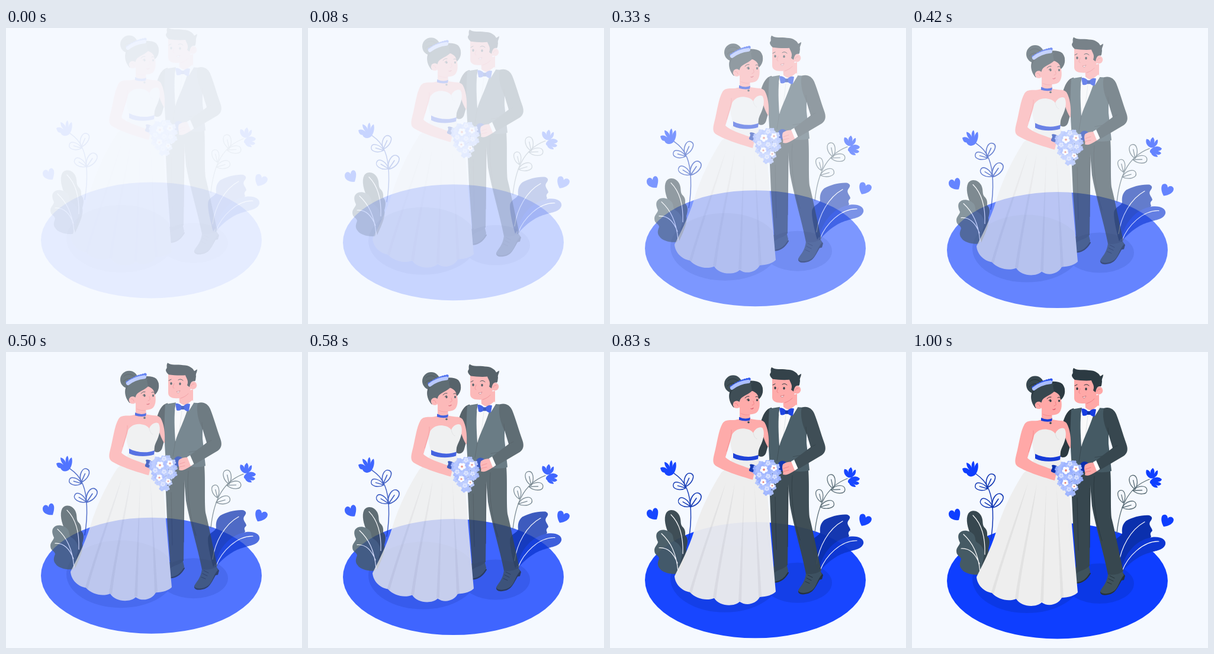
Animation, 500 px wide and 500 px high, one loop 1040 ms. Source, as an HTML page:

```html
<!DOCTYPE html>
<html lang="en">
<head>
<meta charset="utf-8">
<title>Wedding couple</title>
<style>
html, body { margin: 0; width: 100%; height: 100%; overflow: hidden; background: #f5f9ff; }
svg { display: block; width: 100%; height: 100%; }
svg > g { opacity: var(--p, 0); transform: translateY(calc((var(--p, 0) - 1) * 30px)); }
.blue { fill: #0e3eff; }
.navy { fill: #0b30ad; }
.skin { fill: #ffa8a7; }
.hair { fill: #2c3a42; }
.dark { fill: #37474f; }
.slate { fill: #455a64; }
.shoe { fill: #3f525b; }
.cloth { fill: #eee; }
.fold { fill: #e2e2e2; }
.line { fill: none; stroke-linecap: round; stroke-linejoin: round; }
.vein { stroke: #fff; stroke-width: 1.2; }
.ink { stroke: #263238; stroke-width: 1; }
.blush { stroke: #f27f83; stroke-width: 1; }
</style>
</head>
<body>
<svg viewBox="0 0 500 500">
  <defs>
    <path id="leaf" d="M0 0C-9-9-8-23 0-23C8-23 8-9 0 0M0 0V-15"/>
  </defs>

  <g><ellipse class="blue" cx="245.5" cy="386.5" rx="186.5" ry="98"/></g>

  <g>
    <g fill="#001a60" opacity=".15">
      <ellipse cx="194" cy="384" rx="92" ry="57"/>
      <ellipse cx="317" cy="391" rx="58" ry="34"/>
    </g>
  </g>

  <!-- plants -->
  <g>
    <g class="line" stroke="#1238b4" stroke-width="1.5">
      <path d="M133 318C139 283 137 250 130 233C125 220 118 213 108 206"/>
      <use href="#leaf" transform="translate(128 231)rotate(-74)scale(.95)"/>
      <use href="#leaf" transform="translate(127 229)rotate(24)scale(1.07)"/>
      <use href="#leaf" transform="translate(136 262)rotate(-59)"/>
      <use href="#leaf" transform="translate(136 263)rotate(34)scale(1.18)"/>
    </g>
    <path class="blue" d="M108 206C103 212 95 212 92 205C88 205 86 202 85 197C90 194 94 197 97 199C93 195 92 191 92 187C97 188 100 192 101 196C100 191 101 186 104 184C106 188 106 192 105 196C106 192 108 188 111 187C113 194 111 201 108 206Z"/>
    <path class="dark" d="M117 374C110 345 108 328 100 310C94 298 90 282 95 273C101 265 112 268 117 277C121 285 118 291 122 296C128 301 127 307 127 311C133 316 131 325 129 332C131 342 126 354 117 374Z"/>
    <path class="line vein" d="M103 276C118 291 124 315 123 342"/>
    <path class="slate" d="M80 306C85 299 98 301 104 308C108 313 106 318 109 321C118 326 121 333 122 340C120 355 117 365 113 376C100 377 88 373 84 367C78 360 82 354 83 350C82 344 75 345 75 336C75 330 81 326 81 322C78 316 77 310 80 306Z"/>
    <path class="line vein" d="M87 308C102 322 112 340 115 372M83 332C97 331 107 340 114 358"/>

    <g class="line" stroke="#5b6d76" stroke-width="1.3">
      <path d="M346 306C350 268 361 230 401 215"/>
      <use href="#leaf" transform="translate(357 255)rotate(-13)scale(.95)"/>
      <use href="#leaf" transform="translate(355 263)rotate(74)scale(1.05)"/>
      <use href="#leaf" transform="translate(377 232)rotate(-12)scale(1.05)"/>
      <use href="#leaf" transform="translate(373 234)rotate(88)scale(1.04)"/>
    </g>
    <path class="blue" d="M402 213C396 210 394 204 396 199C400 199 402 202 403 205C402 201 404 198 407 196C410 199 410 203 409 206C411 202 413 200 415 200C416 205 414 209 411 211C408 214 404 214 402 213ZM403 217C408 211 416 209 422 215C421 219 417 220 412 219C416 219 420 221 421 223C418 227 414 226 410 223C413 225 415 227 415 229C411 230 405 227 404 223C402 222 401 220 403 217Z"/>
    <path class="navy" d="M350 372C344 350 339 326 342 320C345 313 353 312 355 306C354 297 356 290 362 285C373 279 388 275 401 276C408 279 405 283 402 287C399 293 406 297 406 302C401 307 403 308 404 312C397 321 380 326 370 340Z"/>
    <path fill="#0d36d2" d="M353 373C356 345 375 318 405 313C420 311 430 317 428 325C425 335 410 336 405 338C390 342 375 348 353 373Z"/>
    <path class="line vein" d="M393 287C369 300 353 330 349 359M417 320C390 319 364 346 355 370"/>
  </g>

  <!-- hearts -->
  <g class="blue">
    <path d="M79 284C71 285 62 281 62 274C62 267 69 265 72 271C72 264 79 262 81 269C82 275 80 280 79 284Z"/>
    <path d="M425 295C421 288 420 280 423 276C428 273 432 276 432 281C435 277 441 278 442 283C442 290 434 294 425 295Z"/>
  </g>

  <!-- couple -->
  <g>
    <!-- groom: legs and shoes -->
    <path class="shoe" d="M276 364L298 358L301 371C299 382 289 391 278 390Z"/>
    <path class="line" stroke="#263238" stroke-width="2" d="M279 390C290 389 297 381 301 374"/>
    <path class="dark" d="M268 200H302L300 361C293 369 285 368 278 374L272 290Z"/>
    <path fill="#263238" d="M354 370L360 378L358 385L354 386C347 398 344 408 331 410C322 412 317 409 318 404Z"/>
    <path class="shoe" d="M331 375L355 369L358 377C351 384 349 397 342 403C334 409 323 410 318 405C319 399 329 393 331 375Z"/>
    <path class="line ink" d="M334 378L342 382M332 383L340 387M330 389L337 392"/>
    <path class="dark" d="M299 200H335C337 225 335 260 337 280C343 303 350 340 357 370C350 376 340 377 331 376C324 340 310 295 304 260Z"/>
    <path class="line ink" stroke-opacity=".7" d="M308 210C305 245 310 285 321 319M279 246L281 335M300 230V330"/>

    <!-- groom: jacket -->
    <path class="hair" d="M273 95C263 97 258 108 254 122L250 176C256 181 263 176 264 170L278 120Z"/>
    <path fill="#fafafa" d="M284 98L292 91L315 92L309 130L286 168Z"/>
    <path class="line" stroke="#d7dde0" stroke-width=".8" d="M297 108L293 142"/>
    <path class="slate" d="M269 97L287 94C283 115 285 140 286 160C290 145 303 122 310 94L326 95C334 100 332 130 332 155L337 201C327 204 314 204 304 201L270 192C267 160 267 125 269 97Z"/>
    <path class="line ink" stroke-opacity=".45" d="M286 160L282 185M309 178L326 175"/>

    <!-- groom: head -->
    <path class="skin" d="M292 78L316 72L316 93C309 99 301 101 293 94Z"/>
    <path fill="#fff" d="M291 92L298 102L285 107L287 95ZM315 90L299 102L309 108L317 95Z"/>
    <path class="skin" d="M274 44L310 42L313 68C309 83 298 88 287 87C280 87 274 84 274 78Z"/>
    <circle class="skin" cx="315.500" cy="65" r="6.800"/>
    <path class="hair" d="M275 47C270 43 269 39 271 37C273 34 270 32 273 27C279 32 289 29 299 31C309 31 316 36 318 41L323 38C323 43 320 45 321 50C320 55 321 59 317 58C312 58 311 64 310 68L306 65C309 57 305 54 303 48C294 49 283 48 275 47Z"/>
    <g class="hair">
      <ellipse cx="279" cy="62" rx="1.700" ry="2.200"/><ellipse cx="294" cy="62.500" rx="1.700" ry="2.200"/>
    </g>
    <path class="line ink" stroke-width="1.600" d="M275 57L279 55M291 56Q295 53 299 57"/>
    <path class="line blush" d="M284 62C283 66 280 69 284 70M313 66Q314 62 318 63M295 87Q304 84 308 79"/>
    <path fill="#fff" stroke="#c4626b" stroke-width=".8" d="M288 75.500Q291 76 294 74Q293 78 290 78Z"/>
    <path fill="#153ce0" d="M297 100C292 95 288 95 286 96L288 107C292 109 295 107 297 105H300C304 109 308 110 309 108L311 97C307 95 303 97 300 100Z"/>
    <path class="navy" d="M296 100H301V106H296Z"/>

    <!-- bride: torso -->
    <path class="skin" d="M219 98L236 103L237 114C247 117 256 114 261 120C267 130 269 145 268 163C263 157 261 149 258 142L248 169L207 163L200 125C206 115 212 117 219 114Z"/>
    <path class="cloth" d="M208 178C206 165 201 155 204 145C208 134 218 129 229 131C236 132 240 135 242 138C245 130 254 126 258 130C262 138 259 150 254 160C250 168 250 174 251 179Z"/>
    <path class="line" stroke="#dedede" d="M242 138C243 143 245 147 248 148"/>
    <path class="cloth" d="M207 179C217 185 239 185 251 180L265 224C268 275 275 345 280 406C276 411 264 415 253 415C247 427 230 431 219 423C208 433 184 430 176 417C164 422 146 419 135 407C122 405 110 394 109 380C120 358 133 333 142 304C153 267 169 235 188 205C198 197 203 188 207 179Z"/>
    <path class="fold" d="M196 221C175 280 151 350 134 406L138 409C154 350 178 285 196 221ZM211 222C198 285 184 350 174 416L179 418C187 350 202 290 211 222ZM227 222L217 422L222 422ZM244 225L251 416L256 414ZM259 236L273 380L268 330Z"/>
    <path fill="#163bd8" d="M208 172C221 179 239 180 251 175L250 182C238 186 220 186 208 180Z"/>
    <path class="skin" d="M205 146L195 179C204 188 225 194 245 201L241 217C216 210 190 201 178 193C173 189 174 182 176 174C181 155 183 134 190 122C195 114 205 117 212 116Z"/>
    <path class="line blush" stroke-opacity=".7" d="M205 133C206 142 201 155 197 169M221 105Q229 109 236 107"/>

    <!-- bride: head -->
    <path fill="#163bd8" d="M218 111Q228 116 237 112L236 117Q227 119 218 116Z"/>
    <circle class="dark" cx="234" cy="120" r="1.800"/>
    <circle class="dark" cx="208" cy="55.500" r="15"/>
    <path class="line ink" d="M199 50C205 44 215 46 218 53M198 59C202 53 210 52 214 57"/>
    <path class="hair" d="M209 95C199 84 199 69 207 61C219 50 244 46 254 54C261 62 258 73 252 79L216 92Z"/>
    <path class="skin" d="M215 76C224 75 236 69 242 65C249 68 252 74 252 82C254 91 252 101 247 104C240 108 228 108 220 102Z"/>
    <path class="dark" d="M203 75C207 59 223 52 238 54C247 55 245 62 240 67C231 75 221 76 219 84L217 90L209 94C203 87 201 81 203 75Z"/>
    <path class="hair" d="M238 56C251 49 260 59 258 69C257 75 254 79 251 81C251 73 246 69 240 67Z"/>
    <circle class="skin" cx="214" cy="90" r="6.300"/>
    <path class="line blush" d="M211 88Q215 87 216 92M242 84C243 88 245 90 240 91"/>
    <g class="hair">
      <ellipse cx="234" cy="82.500" rx="1.700" ry="2.100"/><ellipse cx="248.500" cy="82.500" rx="1.500" ry="2.100"/>
    </g>
    <path class="line ink" d="M228 79Q231 75 235 76M246 77Q249 75 251 78M231 82L234 80"/>
    <path class="line" stroke="#d95565" stroke-width="1.300" d="M238 97Q240 98 242 96"/>
    <g id="tiara" fill="#2c55ee"></g>
    <path class="line" stroke="#a9bdff" stroke-width="6" d="M206 62Q217 53 234 51"/>

    <!-- bouquet -->
    <path class="navy" d="M247 194C241 190 237 190 236 192C239 197 234 198 235 202C240 205 244 205 249 206ZM284 190C287 184 293 184 297 187C299 190 294 193 298 195C296 201 290 204 285 202Z"/>
    <g id="bouquet"></g>

    <!-- groom: arm -->
    <path class="skin" d="M292 191C298 186 306 187 311 186L315 200C307 204 300 211 292 208C294 203 289 199 292 191Z"/>
    <path class="line blush" d="M293 198L302 195M293 203L302 201"/>
    <path fill="#fff" d="M306 186L313 182L319 197L312 201Z"/>
    <path class="dark" d="M324 95C333 92 341 96 345 105C351 120 356 138 362 155C366 166 363 172 357 176L318 199L311 183L339 162L332 139C324 124 321 106 324 95Z"/>
    <path class="line ink" stroke-opacity=".5" d="M339 162L347 158M332 139L331 128"/>
  </g>
</svg>
<script>
const LOOP = 1040, STEP = 1000 / 24, STEPS = 25;

const dot = (x, y, r, fill) =>
  `<circle cx="${x.toFixed(1)}" cy="${y.toFixed(1)}" r="${r}"${fill ? ` fill="${fill}"` : ''}/>`;

const blossom = (x, y, r, fill, heart) => {
  let out = '';
  for (let i = 0; i < 5; i++) {
    const a = i * Math.PI * .4 - .9;
    out += dot(x + r * Math.cos(a), y + r * Math.sin(a), r * .72, fill);
  }
  return out + dot(x, y, r * .5, heart);
};

// Blossoms spiral out from the middle and narrow towards the tip.
let flowers = '';
const shades = ['#9db4ff', '#a9bdff', '#93abff', '#b0c3ff'], count = 46;
for (let i = count; i >= 0; i--) {
  const a = i * 2.4, r = Math.sqrt(i / count), v = r * Math.sin(a);
  const x = 266 + 22 * r * Math.cos(a) * (v > 0 ? 1 - .35 * v : 1);
  flowers += blossom(x, 206 + v * (v > 0 ? 36 : 20), 3, shades[i % 4], '#a6baff');
}
for (const [x, y] of [[252, 209], [267, 189], [278, 212], [267, 211], [265, 232]])
  flowers += blossom(x, y, 2.5, '#d5dfff', '#b5c6ff');
for (const [x, y, r] of [[260, 200, 3.8], [277, 197, 3.2], [259, 221, 3.2], [274, 227, 2.6]])
  flowers += blossom(x, y, r, '#fff', '#e98276');
document.getElementById('bouquet').innerHTML = flowers;

let gems = '';
for (let i = 0; i < 9; i++) {
  const u = i / 8;
  gems += dot(205 + 30 * u, 60 - 21 * u + 8 * u * u, 2.6);
}
document.getElementById('tiara').innerHTML = gems;

// Ease-out: cubic-bezier(0, 0, .58, 1)
function easeOut(x) {
  let lo = 0, hi = 1;
  for (let i = 0; i < 24; i++) {
    const s = (lo + hi) / 2;
    if (1.74 * s * s - .74 * s ** 3 < x) lo = s; else hi = s;
  }
  return hi * hi * (3 - 2 * hi);
}

const start = performance.now();
function draw() {
  const time = (performance.now() - start) % LOOP;
  const step = Math.min(STEPS, Math.floor((time + 5) / STEP) + 1);
  document.documentElement.style.setProperty('--p', easeOut(step / STEPS).toFixed(4));
  requestAnimationFrame(draw);
}
draw();
</script>
</body>
</html>
```
